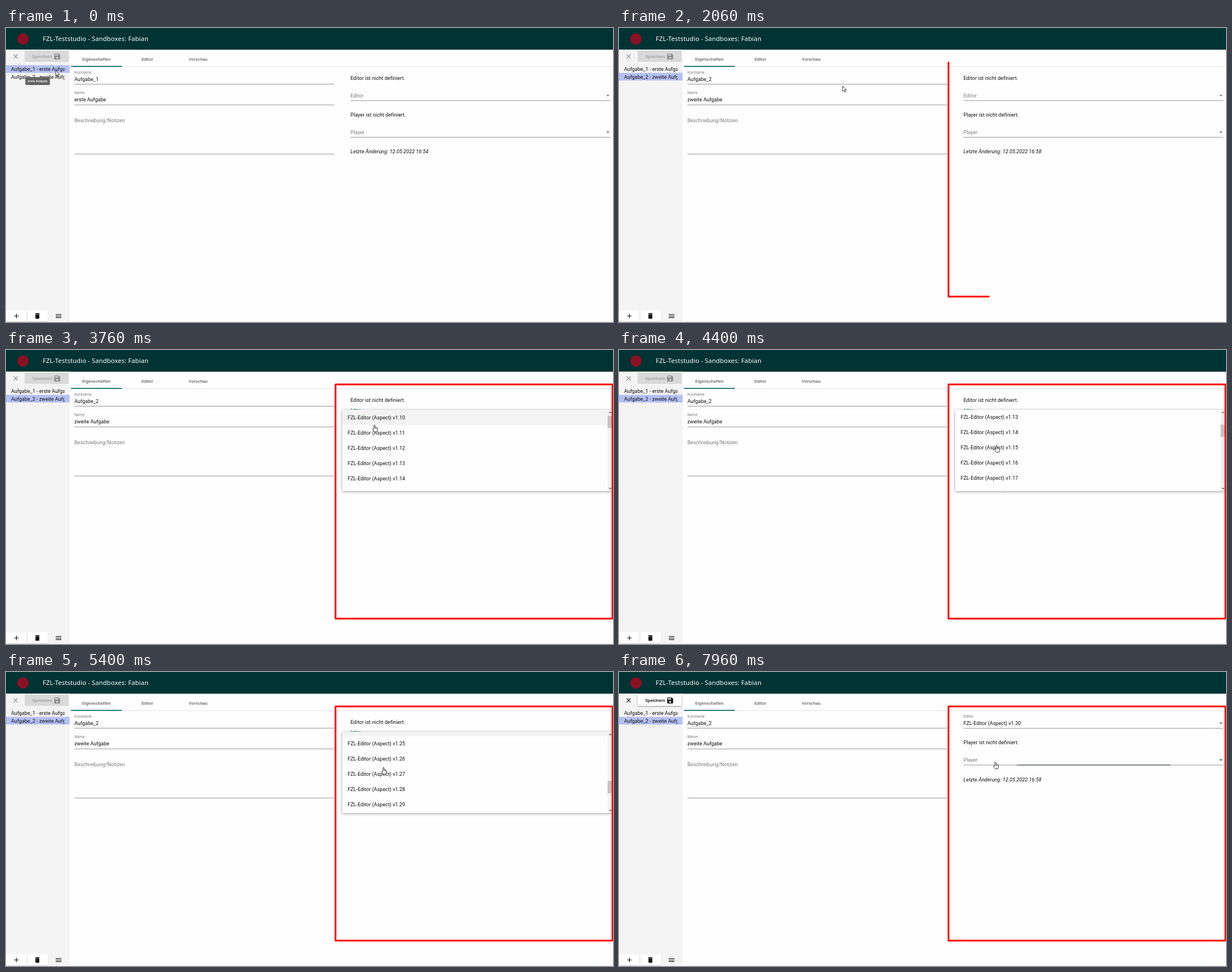
An HTML page with a canvas for the animation above (8000 ms loop, 1074 by 521 pixels).

```html
<!DOCTYPE html>
<html lang="de">
<head>
<meta charset="utf-8">
<title>Teststudio</title>
<style>
html, body { margin: 0; width: 100%; height: 100%; overflow: hidden; background: #fefefe; }
canvas { display: block; width: 1074px; height: 521px; }
</style>
</head>
<body>
<canvas id="stage" width="1074" height="521"></canvas>
<script>
const ctx = document.getElementById('stage').getContext('2d');
const LOOP = 8000;
const INK = '#0e0e0e', HINT = '#7c7c7c', LINE = '#949494', TEAL = '#0d6669';
const ROW = 27, TOP = 106, LEFT = 595, PANEL_H = 144, PIVOT = 119.5;

const icons = {
  save: 'M17 3H5a2 2 0 0 0-2 2v14a2 2 0 0 0 2 2h14a2 2 0 0 0 2-2V7zM12 19a3 3 0 1 1 0-6 3 3 0 0 1 0 6zM15 9H5V5h10z',
  trash: 'M6 19a2 2 0 0 0 2 2h8a2 2 0 0 0 2-2V7H6zM19 4h-3.5l-1-1h-5l-1 1H5v2h14z',
  add: 'M19 13h-6v6h-2v-6H5v-2h6V5h2v6h6z',
  menu: 'M3 18h18v-2H3zM3 13h18v-2H3zM3 6v2h18V6z',
  close: 'M19 6.4 17.6 5 12 10.6 6.4 5 5 6.4 10.6 12 5 17.6 6.4 19 12 13.4 17.6 19 19 17.6 13.4 12z'
};
for (const k in icons) icons[k] = new Path2D(icons[k]);
const arrowShape = new Path2D('M0 0V9.5L2.2 7.6 3.8 11 5.3 10.3 3.8 7 6.6 6.8Z');
const handShape = new Path2D('M-1 7V.8Q0-.5 1 .8V4.2L4.6 5Q5.7 5.4 5.5 6.8L4.6 12.2H-.4L-3.2 8.2Q-3.5 6.6-2.2 6.6Z');
const handFolds = new Path2D('M1 4.2V7M2.5 4.6V7M4 5V7');

const clamp = x => Math.max(0, Math.min(1, x));
const span = (t, a, b) => clamp((t - a) / (b - a));
const easeOut = (x, p) => 1 - Math.pow(1 - x, p);
const mix = (a, b, k) => a + (b - a) * k;

function box(x, y, w, h, color) {
  ctx.fillStyle = color;
  ctx.fillRect(x, y, w, h);
}

function card(x, y, w, h, r, color) {
  ctx.fillStyle = color;
  ctx.beginPath();
  ctx.roundRect(x, y, w, h, r);
  ctx.fill();
}

// shadow around a card only, so that translucent cards stay clear
function shadow(x, y, w, h, blur, color) {
  ctx.save();
  ctx.beginPath();
  ctx.rect(x - 20, y - 20, w + 40, h + 40);
  ctx.roundRect(x, y, w, h, 2);
  ctx.clip('evenodd');
  ctx.shadowColor = color;
  ctx.shadowBlur = blur;
  ctx.shadowOffsetY = 1;
  card(x, y, w, h, 2, '#fff');
  ctx.restore();
}

// yc is the middle of the capitals
function text(s, x, yc, { size = 9, color = INK, style = '', align = 'left', face = 'Roboto', gap = 0 } = {}) {
  ctx.font = `${style} ${size}px ${face}, sans-serif`;
  ctx.letterSpacing = gap + 'px';
  ctx.textAlign = align;
  ctx.fillStyle = color;
  ctx.fillText(s, x, yc + size * 0.356);
}

function icon(name, cx, cy, color, scale = 0.5625) {
  ctx.save();
  ctx.translate(cx, cy);
  ctx.scale(scale, scale);
  ctx.translate(-12, -12);
  ctx.fillStyle = color;
  ctx.fill(icons[name], 'evenodd');
  ctx.restore();
}

// start, end, target x, target y
const moves = [
  [60, 560, 83, 80.5],
  [1800, 2600, 646.5, 120.5],
  [3700, 4160, 668, 169],
  [6100, 6500, 667.5, 211],
  [7250, 7700, 666, 159.5]
];

function pointer(t) {
  let x = 88, y = 75.5;
  for (const [a, b, tx, ty] of moves) {
    const k = easeOut(span(t, a, b), 2.05);
    x = mix(x, tx, k);
    y = mix(y, ty, k);
  }
  return { x, y };
}

const scrollAt = t =>
  337.5 * easeOut(span(t, 4330, 4800), 1.7) + 111 * easeOut(span(t, 5300, 5560), 1.58);

// the highlight stays on its row while the list scrolls
function activeRow(t) {
  if (t > 4330 && t < 4800) t = 4330;
  if (t > 5300 && t < 5560) t = 5300;
  return Math.floor((pointer(t).y - TOP + scrollAt(t)) / ROW);
}

const optionName = i => 'FZL-Editor (Aspect) v1.' + (i < 21 ? 10 + i : i - 13);

function header() {
  box(0, 0, 1074, 38.5, '#003334');
  ctx.fillStyle = '#8c1024';
  ctx.beginPath();
  ctx.arc(30, 19.5, 10, 0, 7);
  ctx.fill();
  text('FZL-Teststudio - Sandboxes: Fabian', 65, 19.3,
    { size: 11.25, color: '#fff', style: '500', face: '"Noto Sans"', gap: 0.1 });
}

function sidebar(t) {
  const dirty = t >= 7200;
  box(0, 38.5, 112.5, 482.5, '#f4f4f4');
  icon('close', 17, 50.3, dirty ? INK : '#8a8a8a');
  if (dirty) shadow(33, 40, 78, 20, 3, 'rgba(0,0,0,.4)');
  card(33, 40, 78, 20, 2, dirty ? '#fff' : '#d9d9d9');
  const color = dirty ? INK : '#a0a0a0';
  text('Speichern', 46.3, 50, { size: 7.875, style: '500', color });
  icon('save', 90.5, 50.5, dirty ? INK : '#8c8c8c', 0.58);

  box(0, t < 960 ? 66 : 79.5, 112.5, 13.5, '#b5c0f5');
  ctx.save();
  ctx.beginPath();
  ctx.rect(0, 60, 103.5, 60);
  ctx.clip();
  text('Aufgabe_1 - erste Aufgabe', 9, 72.8);
  text('Aufgabe_2 - zweite Aufgabe', 9, 86.3);
  ctx.restore();

  for (const x of [0, 38]) {
    shadow(x, 500.5, 36, 19.5, 1.5, 'rgba(0,0,0,.22)');
    card(x, 500.5, 36, 19.5, 1, '#fff');
  }
  icon('add', 18.4, 510.3, INK);
  icon('trash', 55.5, 510.3, INK);
  icon('menu', 93, 510.3, INK);
}

function tooltip(s, yc, w, alpha) {
  if (!alpha) return;
  ctx.globalAlpha = alpha;
  card(56 - w / 2, yc - 7, w, 14, 2, '#636363');
  text(s, 56, yc, { size: 5.6, color: '#fff', align: 'center', style: '500' });
  ctx.globalAlpha = 1;
}

function tabs() {
  box(113, 68, 961, 1, '#e2e2e2');
  box(115, 67, 90, 2, '#2b7e7c');
  ['Eigenschaften', 'Editor', 'Vorschau'].forEach((s, i) =>
    text(s, 160 + 90 * i, 55, { size: 7.875, style: '500', color: '#676767', align: 'center' }));
}

function leftForm(second) {
  const label = { size: 6.75, color: HINT };
  text('Kurzname', 121, 78.3, label);
  text(second ? 'Aufgabe_2' : 'Aufgabe_1', 121, 90.6);
  text('Name', 121, 115, label);
  text(second ? 'zweite Aufgabe' : 'erste Aufgabe', 121, 127.2);
  text('Beschreibung/Notizen', 121, 164, { color: HINT });
  for (const y of [99, 135.8, 222.8]) box(121, y, 460, 1, LINE);
}

function caret(y, color) {
  ctx.fillStyle = color;
  ctx.beginPath();
  ctx.moveTo(1062.2, y - 1.3);
  ctx.lineTo(1067.8, y - 1.3);
  ctx.lineTo(1065, y + 1.6);
  ctx.fill();
}

// k is the share of the line that is drawn, from the middle
function focusLine(y, k, color) {
  box(839.75 - 230 * k, y, 460 * k, 1.2, color);
}

function rightForm(t, second) {
  const x = 609.5;
  const up = t >= 7200 ? 28.8 : 0;
  const focus = t >= 2880 && t < 7660;
  const note = { gap: 0.05 };
  if (!up) text('Editor ist nicht definiert.', x, 88.8, note);

  const rise = easeOut(span(t, 2880, 3280), 3);
  text('Editor', x, mix(119.7, 107, rise) - up,
    { size: mix(9, 6.75, rise), color: focus ? TEAL : HINT });
  if (t >= 6900) text('FZL-Editor (Aspect) v1.30', x, 119.7 - up);
  box(x, 128.2 - up, 460, 1, LINE);
  if (focus) focusLine(127.9 - up, easeOut(span(t, 2880, 3100), 3), TEAL);
  caret(119.7 - up, focus ? TEAL : '#6c6c6c');

  text('Player ist nicht definiert.', x, 154 - up, note);
  text('Player', x, 184.3 - up, { color: HINT });
  box(x, 193.2 - up, 460, 1, LINE);
  if (t >= 7960) focusLine(193 - up, 0.59, '#4c5656');
  caret(184.8 - up, t >= 7660 ? TEAL : '#6c6c6c');
  text('Letzte Änderung: 12.05.2022 16:5' + (second ? 8 : 4), x, 219.2 - up,
    { style: 'italic', gap: 0.06 });
}

function chevron(x, y, dir) {
  ctx.strokeStyle = '#505050';
  ctx.lineWidth = 1.1;
  ctx.beginPath();
  ctx.moveTo(x - 2, y + dir);
  ctx.lineTo(x, y - dir);
  ctx.lineTo(x + 2, y + dir);
  ctx.stroke();
}

function panel(t) {
  if (t < 2988 || t >= 7000) return;
  const open = easeOut(span(t, 2988, 3108), 3.4);
  const w = 460 + 18.5 * open, right = LEFT + w;
  const scroll = scrollAt(t), active = activeRow(Math.min(t, 6900));

  ctx.save();
  ctx.globalAlpha = open * (1 - span(t, 6900, 7000));
  ctx.translate(0, PIVOT);
  ctx.scale(1, mix(0.8, 1, open));
  ctx.translate(0, -PIVOT);
  shadow(LEFT, TOP, w, PANEL_H, 5, 'rgba(0,0,0,.4)');
  card(LEFT, TOP, w, PANEL_H, 2, '#fefefe');
  ctx.beginPath();
  ctx.roundRect(LEFT, TOP, w, PANEL_H, 2);
  ctx.clip();

  const first = Math.floor(scroll / ROW);
  for (let i = first; i < first + 7; i++) {
    const y = TOP + i * ROW - scroll;
    if (i === active) {
      box(LEFT, y, w, ROW, '#f3f3f3');
      if (t >= 6790) ripple(t, y, w);
    }
    text(optionName(i), 604.5, y + ROW / 2);
  }

  box(right - 9, TOP, 9, PANEL_H, '#f1f1f1');
  box(right - 9, 116.3 + scroll * 0.193, 9, 22, '#c3c3c3');
  chevron(right - 4.5, 110.8, 1);
  chevron(right - 4.5, 245.2, -1);
  ctx.restore();
}

function ripple(t, y, w) {
  ctx.save();
  ctx.beginPath();
  ctx.rect(LEFT, y, w, ROW);
  ctx.clip();
  ctx.fillStyle = 'rgba(0,0,0,.1)';
  ctx.beginPath();
  ctx.arc(667.5, 211, 6 + Math.max(0, t - 6830) * 1.2, 0, 7);
  ctx.fill();
  ctx.restore();
}

function frameMark(t) {
  const w = 490, h = 415, total = 2 * (w + h);
  const k = span(t, 1863, 2600);
  if (!k) return;
  ctx.save();
  ctx.strokeStyle = '#f00';
  ctx.lineWidth = 3;
  ctx.lineCap = ctx.lineJoin = 'round';
  ctx.setLineDash([total * k, total * 2]);
  ctx.beginPath();
  ctx.moveTo(583, 61);
  ctx.lineTo(583, 61 + h);
  ctx.lineTo(583 + w, 61 + h);
  ctx.lineTo(583 + w, 61);
  ctx.lineTo(583, 61);
  ctx.stroke();
  ctx.restore();
}

function cursor(t) {
  const { x, y } = pointer(t);
  const hand = (t >= 2600 && t < 7000) || t >= 7600;
  const shape = hand ? handShape : arrowShape;
  ctx.save();
  ctx.translate(x, y);
  ctx.fillStyle = '#fff';
  ctx.fill(shape);
  ctx.strokeStyle = '#222';
  ctx.lineWidth = 0.9;
  ctx.lineJoin = 'round';
  ctx.stroke(shape);
  if (hand) {
    ctx.lineWidth = 0.5;
    ctx.stroke(handFolds);
  }
  ctx.restore();
}

function draw(t) {
  const second = t >= 1100;
  box(0, 0, 1074, 521, '#fefefe');
  header();
  sidebar(t);
  tabs();
  leftForm(second);
  rightForm(t, second);
  box(113, 520, 961, 1, '#ebebeb');
  panel(t);
  tooltip('erste Aufgabe', 94, 43.5, 1 - span(t, 60, 150));
  tooltip('zweite Aufgabe', 107.5, 47, span(t, 420, 520) * (1 - span(t, 960, 1060)));
  frameMark(t);
  cursor(t);
}

function tick() {
  draw(performance.now() % LOOP);
  requestAnimationFrame(tick);
}
tick();
</script>
</body>
</html>
```
